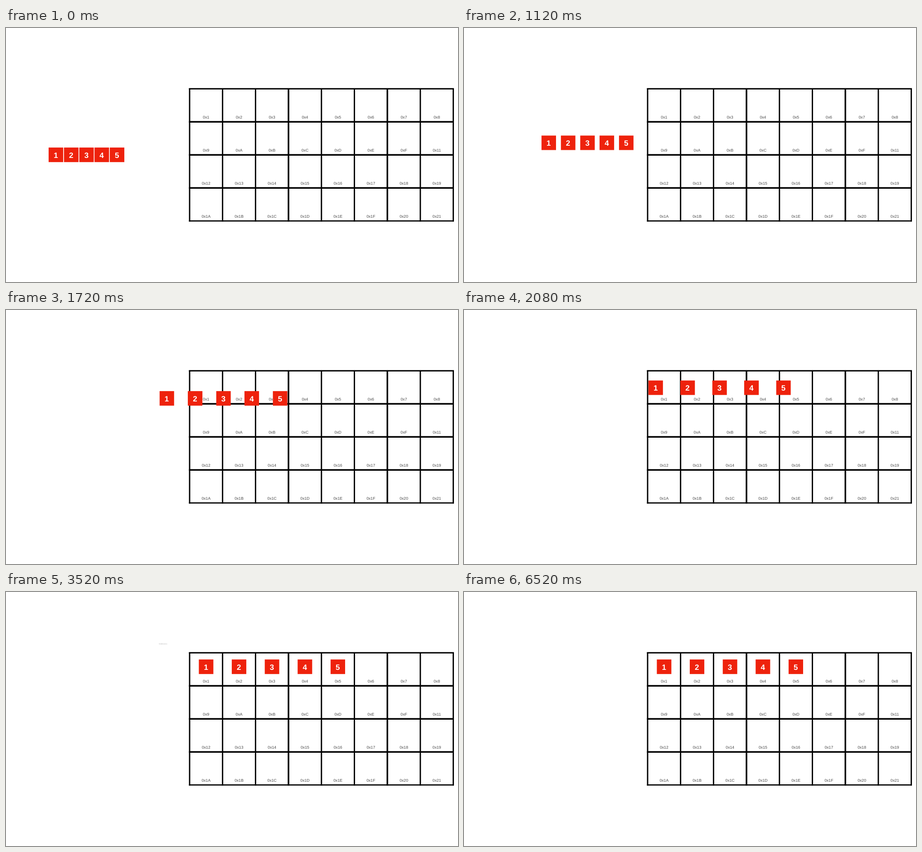
An HTML page for the animation above (7 s loop, 997 px wide and 561 px high).

```html
<!DOCTYPE html>
<html lang="en">
<head>
<meta charset="utf-8">
<title>Array in memory</title>
<style>
  html, body { margin: 0; width: 100%; height: 100%; overflow: hidden; background: #fff; }
  svg { display: block; width: 997px; height: 561px; }
  text {
    font-family: "Liberation Sans", Arial, Helvetica, sans-serif;
    text-anchor: middle;
    text-rendering: geometricPrecision;
  }
  line { stroke: #000; }
  .address { font-size: 8.7px; fill: #484848; }
  .item rect { fill: #ee220c; }
  .item text { font-size: 17px; font-weight: bold; fill: #fff; }
  .index { font-size: 12.4px; fill: #000; }
  .title { font-weight: bold; }

  .item { animation: move 1920ms ease-in-out 480ms both paused; }
  .index { transform-origin: 0 0; animation: pop 440ms linear both paused; }
  #indexes { animation: gone 480ms linear 6520ms forwards paused; }

  @keyframes move {
    from { transform: translate(var(--from), 264px); }
    to { transform: translate(var(--to), 149px); }
  }
  @keyframes pop {
    0% { transform: scale(.2); opacity: 0; }
    45% { transform: scale(1.08); opacity: 1; animation-timing-function: ease-in-out; }
    100% { transform: scale(1); opacity: 1; }
  }
  @keyframes gone {
    from, to { visibility: hidden; }
  }
</style>
</head>
<body>
<svg viewBox="0 0 997 561">
  <g id="grid"></g>
  <g id="items"></g>
  <g id="indexes"></g>
</svg>
<script>
  const LOOP = 7000, STEP = 40;
  const COLS = 8, ROWS = 4, LEFT = 405, TOP = 134.3, CELL_W = 72.7, CELL_H = 72.95;

  function add(parent, tag, attrs, text) {
    const el = document.createElementNS("http://www.w3.org/2000/svg", tag);
    for (const key in attrs) el.setAttribute(key, attrs[key]);
    if (text !== undefined) el.textContent = text;
    return parent.appendChild(el);
  }

  const byId = id => document.getElementById(id);
  const colX = c => LEFT + c * CELL_W;
  const rowY = r => TOP + r * CELL_H;
  const midX = c => colX(c) + CELL_W / 2;

  function drawGrid() {
    const grid = byId("grid");
    for (let c = 0; c <= COLS; c++) {
      add(grid, "line", {
        x1: colX(c), x2: colX(c), y1: TOP - 1.4, y2: rowY(ROWS) + 1.4,
        "stroke-width": c === 3 || c === 6 ? 3.5 : 2.9
      });
    }
    for (let r = 0; r <= ROWS; r++) {
      add(grid, "line", {
        x1: LEFT - 1.4, x2: colX(COLS) + 1.4, y1: rowY(r), y2: rowY(r),
        "stroke-width": r % ROWS ? 3.5 : 2.9
      });
    }
    for (let i = 0; i < COLS * ROWS; i++) {
      // 0x10 is skipped
      const address = i < 15 ? i + 1 : i + 2;
      add(grid, "text", {
        class: "address", x: midX(i % COLS), y: rowY(Math.floor(i / COLS)) + 65.9
      }, "0x" + address.toString(16).toUpperCase());
    }
  }

  function drawItems() {
    for (let i = 0; i < 5; i++) {
      const from = 94 + i * 33.7, to = 425.2 + i * 72.65;
      const item = add(byId("items"), "g", {
        class: "item", style: `--from:${from}px;--to:${to}px`
      });
      add(item, "rect", { width: 32.2, height: 32.2 });
      add(item, "text", { x: 16, y: 22.5 }, i + 1);
    }
  }

  function drawIndexes() {
    ["Indexes:", 0, 1, 2, 3, 4].forEach((label, i) => {
      const x = i ? midX(i - 1) : 346.8;
      const spot = add(byId("indexes"), "g", { transform: `translate(${x} 114.1)` });
      add(spot, "text", {
        class: i ? "index" : "index title", y: 4.4,
        style: `animation-delay:${3480 + i * 393}ms`
      }, label);
    });
  }

  drawGrid();
  drawItems();
  drawIndexes();

  const motions = document.getAnimations();
  const start = performance.now();

  function render() {
    const t = Math.max(0, performance.now() - start) % LOOP;
    const time = Math.floor(t / STEP) * STEP;
    for (const motion of motions) motion.currentTime = time;
    requestAnimationFrame(render);
  }
  render();
</script>
</body>
</html>
```
